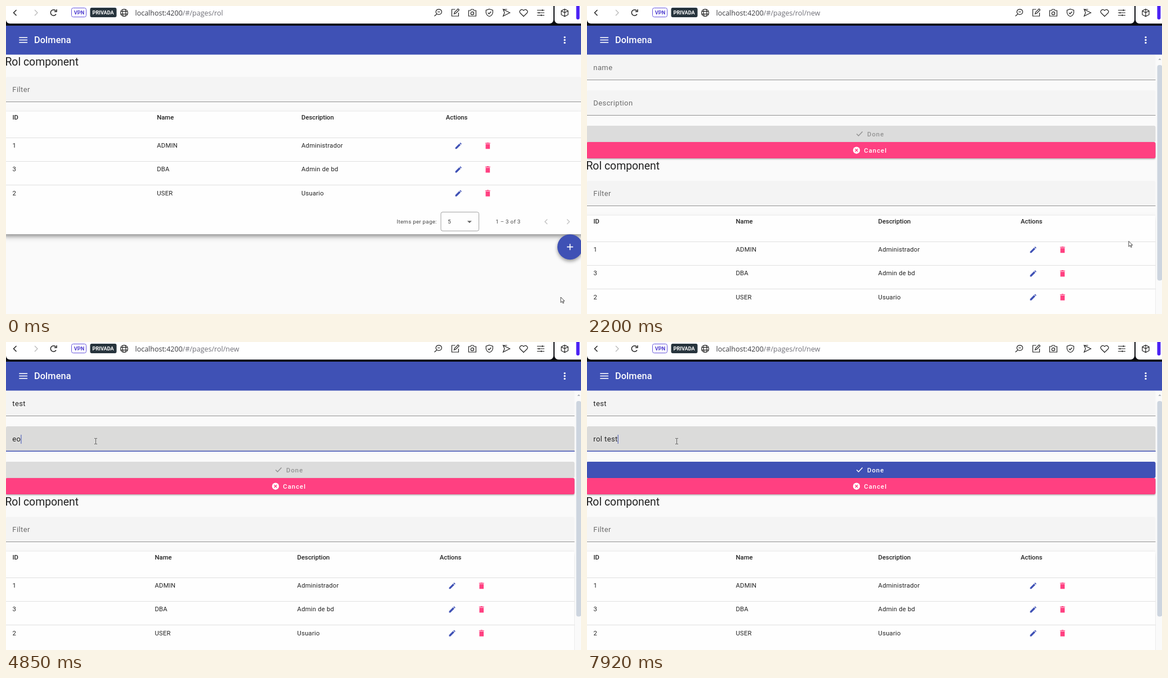
Animation of 1022 by 548 pixels, one loop 8000 ms. Source, as an HTML page with a canvas:

```html
<!DOCTYPE html>
<html lang="es">
<head>
<meta charset="utf-8">
<title>Rol component</title>
<style>
html, body { margin: 0; width: 100%; height: 100%; overflow: hidden; background: #fafafa; }
canvas { display: block; width: 1022px; height: 548px; }
</style>
</head>
<body>
<canvas id="stage"></canvas>
<script>
const W = 1022, H = 548, LOOP = 8000, STEP = 66.5, KEY = 65;
const BLUE = '#3f51b5', PINK = '#ff4081', INK = '#222', HINT = '#6b6b6b', DARK = '#222';
const FORM_W = 1010.5, EDIT_AT = 2195;
const cv = document.getElementById('stage');
const c = cv.getContext('2d');
const dpr = window.devicePixelRatio || 1;
cv.width = W * dpr;
cv.height = H * dpr;

const shapes = {
  pencil: 'M-5.7 5.7V3.3L1.3-3.7L3.7-1.3L-3.3 5.7ZM2-4.4L3.3-5.6L5.6-3.3L4.4-2Z',
  trash: 'M-3.8-3.1H3.8V5.7H-3.8ZM-4.4-5H-2L-1.4-5.7H1.4L2-5H4.4V-3.8H-4.4Z',
  arrow: 'M0 0V9.6L2.3 7.5L4 11L5.5 10.3L3.9 7H6.9Z',
  hand: 'M0 0H2V4.5L7 5.5V8L6 11H1L-2.5 7L-1 6L0 7Z',
  beam: 'M-2.5-5H-.5L0-4.5L.5-5H2.5M0-4.5V4.5M-2.5 5H-.5L0 4.5L.5 5H2.5',
  left: 'M2.5-5L-2.5 0L2.5 5',
  right: 'M-2.5-5L2.5 0L-2.5 5',
  down: 'M-4-2H4L0 2Z',
  up: 'M-2.5 1.5H2.5L0-1.5Z',
  reload: 'M4.5 2.5A5.2 5.2 0 1 1 4-3.5M5.5-6V-2H1.5',
  globe: 'M-6-2.3H6M-6 2.3H6M0-6.5A3 6.5 0 0 0 0 6.5A3 6.5 0 0 0 0-6.5A6.5 6.5 0 0 0 0 6.5A6.5 6.5 0 0 0 0-6.5',
  check: 'M-5 0L-1.7 3.4L5.3-4',
  cross: 'M-2.4-2.4L2.4 2.4M2.4-2.4L-2.4 2.4',
  plus: 'M-5.5 0H5.5M0-5.5V5.5',
  cube: 'M0-6.5L6-3.5V3.5L0 6.5L-6 3.5V-3.5ZL0 0L6-3.5M-6-3.5L0 0V6.5'
};
// browser buttons, left to right
const tools = [
  'M6.5-1.5A5.3 5.3 0 0 1-4-1.5A5.3 5.3 0 0 1 6.5-1.5M-2.5 2.5L-6.5 6M-1-1.5H3.5',
  'M0-6H-6V6H6V0M-2 2L-1-1L5-7L7-5L1 1Z',
  'M-6.5-4H-3L-2-6H2L3-4H6.5V6H-6.5ZM2.7 1A2.7 2.7 0 0 1-2.7 1A2.7 2.7 0 0 1 2.7 1',
  'M0-6.5L6-4.5V0Q5 5 0 6.5Q-5 5-6 0V-4.5ZM-2.5 0L-.7 2L3-2',
  'M-6-6L6 0L-6 6L-3.5 0ZH1',
  'M0 6.5L-6 .5C-9-3-4-8 0-4C4-8 9-3 6 .5Z',
  'M-6.5-4.5H6.5M-6.5 0H6.5M-6.5 4.5H6.5M3-6V-3M-3-1.5V1.5M1 3V6'
];
const rows = [['1', 'ADMIN', 'Administrador'], ['3', 'DBA', 'Admin de bd'], ['2', 'USER', 'Usuario']];

// pointer moves: from, until, x, y
const moves = [
  [40, 730, 266, 159], [870, 1060, 253, 149], [1330, 2000, 994, 428],
  [2130, 2190, 963, 418.5], [2190, 2740, 162, 112], [3730, 3910, 159.5, 176.5]
];
// bursts of keys; '<' erases
const nameKeys = { 3330: 'te', 3660: 'st' };
const descKeys = {
  4390: 'e', 4790: 'o', 5050: 'l', 5580: ' t', 6050: '<<<<',
  6650: '<r', 6980: 'o', 7180: 'l', 7380: ' t', 7650: 'es', 7920: 't'
};

const clamp = v => Math.max(0, Math.min(1, v));
const within = (v, a, b) => v > a && v < b;
const mix = (a, b, k) => `rgb(${a.map((v, i) => Math.round(v + (b[i] - v) * k))})`;

function typed(keys, t) {
  let s = '';
  for (const at in keys)
    [...keys[at]].forEach((k, i) => {
      if (t + 4 >= +at + i * KEY) s = k === '<' ? s.slice(0, -1) : s + k;
    });
  return s;
}

function pointer(t) {
  let x = 986, y = 518;
  for (const [from, until, toX, toY] of moves) {
    const k = clamp((t - from) / (until - from)), e = k * k * (3 - 2 * k);
    x += (toX - x) * e;
    y += (toY - y) * e;
  }
  return [x, y];
}

function text(s, x, y, size, color = INK, o = {}) {
  c.font = `${o.weight || 400} ${size}px ${o.family || 'Roboto'}, sans-serif`;
  c.letterSpacing = (o.gap || 0) + 'px';
  c.fillStyle = color;
  c.fillText(s, x, y);
  return c.measureText(s).width;
}

function box(x, y, w, h, color, r = 0) {
  c.fillStyle = color;
  c.beginPath();
  c.roundRect(x, y, w, h, r);
  c.fill();
}

function frame(x, y, w, h, color) {
  c.strokeStyle = color;
  c.lineWidth = 1;
  c.beginPath();
  c.roundRect(x, y, w, h, 3);
  c.stroke();
}

function disc(x, y, r, color) {
  c.fillStyle = color;
  c.beginPath();
  c.arc(x, y, r, 0, Math.PI * 2);
  c.fill();
}

function icon(path, x, y, { fill, stroke, width = 1.2, scale = 1 }) {
  const p = new Path2D(path);
  c.save();
  c.translate(x, y);
  c.scale(scale, scale);
  if (fill) { c.fillStyle = fill; c.fill(p); }
  if (stroke) { c.strokeStyle = stroke; c.lineWidth = width; c.stroke(p); }
  c.restore();
}

function shadowed(dy, blur, alpha, paint) {
  c.save();
  c.shadowColor = `rgba(0,0,0,${alpha})`;
  c.shadowBlur = blur * dpr;
  c.shadowOffsetY = dy * dpr;
  paint();
  c.restore();
}

function browser(path) {
  const pen = { stroke: DARK };
  box(0, 0, W, 36, '#0b0d12');
  box(0, -20, 973, 51.3, '#fff', 7);
  box(975, -20, 60, 51.3, '#fff', 7);
  box(1013.5, -6, 6, 30, '#4b22f4', 3);
  icon(shapes.left, 16, 12, { stroke: DARK, width: 1.5 });
  icon(shapes.right, 53.5, 12, { stroke: '#b5b5b5' });
  icon(shapes.reload, 84.5, 12, { stroke: DARK, width: 1.5 });
  icon(shapes.globe, 210, 12, pen);
  icon(shapes.cube, 993, 12, pen);
  tools.forEach((p, i) => icon(p, 768 + i * 30.4, 12, pen));

  frame(116.5, 3.5, 26, 16, '#6654dc');
  text('VPN', 120.7, 15.2, 9.2, '#5140d0', { weight: 700 });
  box(149.5, 3, 47, 17, '#27343d', 3);
  text('PRIVADA', 153.6, 15.2, 9.1, '#fff', { weight: 700 });
  const font = { family: '"Open Sans"' };
  const w = text('localhost:4200', 229.5, 16.5, 12.5, '#3c3c40', font);
  text('/#/pages/' + path, 229.5 + w, 16.5, 12.5, '#707078', font);
}

function toolbar() {
  box(0, 35, W, 51.5, BLUE);
  for (const i of [-1, 0, 1]) {
    box(23.3, 59.7 + i * 4.3, 14.8, 1.6, '#fff');
    disc(993, 60.5 + i * 4.9, 1.65, '#fff');
  }
  text('Dolmena', 50, 66, 16.3, '#fff', { weight: 500, gap: .1 });
}

function field(y, w, hint, { value = '', hover, focus = 0, wavy } = {}) {
  box(0, y, w, 45, focus ? '#dbdbda' : hover ? '#ebebeb' : '#f4f4f4', [3, 3, 0, 0]);
  box(0, y + 44, w, 1, hover || focus ? '#444' : '#929292');
  if (focus) box(w / 2 * (1 - focus), y + 43.6, w * focus, 1.4, BLUE);
  const tw = text(value || hint, 11.3, y + 27.2, 13, value ? INK : HINT, { gap: .4 });
  if (focus) box(11.3 + (value ? tw : 0), y + 15, 1, 16, BLUE);
  if (!wavy) return;
  c.beginPath();
  for (let x = 11.5; x < 30; x += .5) c.lineTo(x, y + 29.3 + Math.sin(x * 2));
  c.strokeStyle = '#e02828';
  c.lineWidth = 1;
  c.stroke();
}

function button(y, label, x, bg, fg, raised) {
  const paint = () => box(-1, y, FORM_W + 1, 29, bg, 3);
  raised ? shadowed(1.5, 2.5, .3, paint) : paint();
  text(label, x, y + 18.5, 11.35, fg, { weight: 500, gap: 1 });
}

function paginator() {
  const small = { gap: .3 };
  text('Items per page:', 694.5, 387.3, 9.7, '#444', small);
  frame(773, 366.7, 67.5, 33.5, '#a0a0a0');
  text('5', 785.3, 387.3, 9.7, '#333', small);
  icon(shapes.down, 823.8, 384.2, { fill: '#666' });
  text('1 – 3 of 3', 870.3, 387.3, 9.7, '#444', small);
  const pale = { stroke: '#c2c2c2', width: 1.6, scale: .85 };
  icon(shapes.left, 960, 383.7, pale);
  icon(shapes.right, 999.3, 383.7, pale);
}

function list(dy, width, colW, hover) {
  const col = i => 11.4 + colW * i;
  text('Rol component', -1.6, 106.3 + dy, 19.4);
  field(126 + dy, width, 'Filter', { hover });

  c.save();
  c.beginPath();
  c.rect(0, 174 + dy, width, H);
  c.clip();
  const card = () => box(-4, 188 + dy, width + 8, 218, '#fefefe');
  shadowed(4, 5, .22, card);
  shadowed(5, 10, .22, card);
  c.restore();

  ['ID', 'Name', 'Description', 'Actions'].forEach((s, i) =>
    text(s, col(i), 201.5 + dy, 11.3, INK, { weight: 500 }));
  rows.forEach((row, r) => {
    const y = 248.2 + r * 42.2 + dy, x = col(3) + 22.5;
    box(0, Math.round(y - 14.5), width, 1, '#e0e0e0');
    row.forEach((s, i) => text(s, col(i), y + 4, 11.3, INK, { gap: .2 }));
    icon(shapes.pencil, x, y + .4, { fill: BLUE });
    icon(shapes.trash, x + 52, y + .4, { fill: PINK });
  });
}

function fab(t) {
  const x = 1002.5, y = 428.7, down = t >= 2060;
  shadowed(down ? 5 : 3, down ? 9 : 6, .4, () => disc(x, y, 22.5, BLUE));
  if (t >= 1960) disc(x, y, 22.5, `rgba(255,255,255,${down ? .16 : .07})`);
  icon(shapes.plus, x, y, { stroke: '#fff', width: 1.7 });
}

// share of the last 250 ms with a long enough description, eased out
function readiness(t) {
  const n = 25;
  let ready = 0;
  for (let i = 0; i < n; i++) ready += typed(descKeys, t - i * 10).length > 2;
  const now = typed(descKeys, t).length > 2, k = ready / n;
  return now ? 1 - (1 - k) ** 3 : k ** 3;
}

function form(t, q, py) {
  const desc = typed(descKeys, t);
  const onDesc = t >= 4130;
  field(87, FORM_W, 'name', {
    value: typed(nameKeys, t), hover: t > 2500 && py < 132, focus: onDesc ? 0 : clamp((q - 2700) / 180)
  });
  field(150, FORM_W, 'Description', {
    value: desc, hover: within(py, 150, 195), focus: onDesc ? clamp((q - 4080) / 180) : 0,
    wavy: t >= 6050 && desc.startsWith('eol')
  });

  const k = readiness(t);
  const fg = mix([146, 146, 146], [255, 255, 255], k);
  button(213, 'Done', 498, mix([220, 220, 220], [63, 81, 181], k), fg);
  button(242, 'Cancel', 492.3, PINK, '#fff', true);
  icon(shapes.check, 484.3, 227.6, { stroke: fg, width: 1.5 });
  disc(479, 256.7, 6.2, '#fff');
  icon(shapes.cross, 479, 256.7, { stroke: PINK, width: 1.4 });

  box(1011, 86.5, 11, H, '#fafafa');
  icon(shapes.up, 1018, 94.5, { fill: '#a9afb8' });
  box(1013.5, 105, 9, 383.5, '#cdd5df', 4);
}

function draw(t) {
  const q = Math.floor((t + 8) / STEP) * STEP;
  const [px, py] = pointer(q);
  const editing = t >= EDIT_AT, dy = editing ? 185 : 0;
  const onFilter = within(py, 126 + dy, 171 + dy);
  const onField = editing && (py < 132 || within(py, 150, 195));
  const onButton = editing ? within(py, 213, 271) : px > 980 && within(py, 406, 451);

  c.setTransform(dpr, 0, 0, dpr, 0, 0);
  box(0, 0, W, H, '#fafafa');
  if (editing) {
    list(dy, FORM_W, 253.1, onFilter);
    form(t, q, py);
  } else {
    list(dy, W, 256.8, onFilter);
    paginator();
    fab(q);
  }
  browser(editing ? 'rol/new' : 'rol');
  toolbar();
  if (onFilter || onField) icon(shapes.beam, px, py, { stroke: '#555', width: .9 });
  else icon(onButton ? shapes.hand : shapes.arrow, px, py, { fill: '#fff', stroke: '#333', width: .9 });
}

const start = performance.now();
function tick() {
  draw((performance.now() - start) % LOOP);
  requestAnimationFrame(tick);
}
tick();
</script>
</body>
</html>
```
